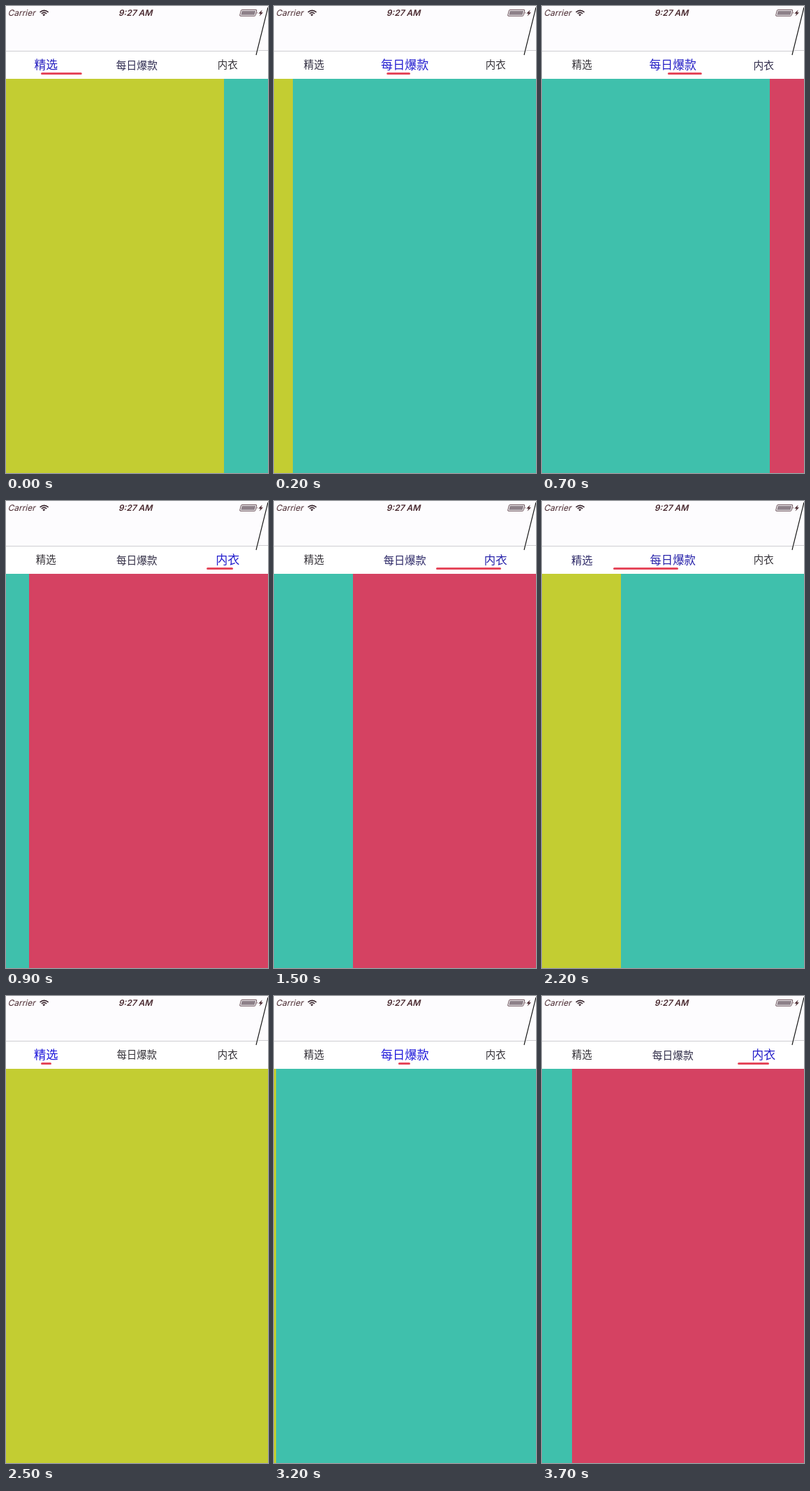
These frames come from a looping animation (375 by 667 pixels, 3800 ms). An HTML page:

```html
<!DOCTYPE html>
<html lang="zh-CN">
<head>
<meta charset="utf-8">
<style>
  html, body { margin: 0; width: 100%; height: 100%; overflow: hidden; background: #fff; }
  svg { display: block; width: 375px; height: 667px; }
  .status { font: 12px Inter, Roboto, sans-serif; fill: #4a2a30; }
  .tab { font: 14.4px "Noto Sans CJK SC", "Noto Sans CJK", sans-serif; text-anchor: middle; }
</style>
</head>
<body>
<svg viewBox="0 0 375 667">
  <rect width="375" height="667" fill="#fff"/>
  <rect width="375" height="64" fill="#fdfcfe"/>
  <path d="M0 64.5H359M361 63.5H375" stroke="#cfced2"/>
  <path d="M358 70L375 2" stroke="#111" stroke-width="1.1"/>

  <g class="status">
    <text transform="translate(2.5 14.3) skewX(-14)">Carrier</text>
    <text transform="translate(185 14.3) skewX(-14)" text-anchor="middle" font-weight="600">9:27 AM</text>
    <g fill="none" stroke="#35222a" stroke-width="1.6">
      <path d="M48.6 8.9Q54.6 3.8 60.6 8.9M50.8 11Q54.5 7.9 58.2 11"/>
      <path d="M52.3 12.2Q54.3 10.8 56.3 12.2L54 14.5Z" fill="#35222a" stroke="none"/>
    </g>
    <g transform="translate(333.8 14.5) skewX(-14)">
      <rect x=".5" y="-9" width="22.5" height="8.7" rx="1.5" fill="none" stroke="#62474f" stroke-width=".9"/>
      <rect x="2" y="-7.6" width="19.5" height="5.9" fill="#8d8088"/>
      <path d="M24 -6.3q1.6 1.6 0 3.2z"/>
    </g>
    <path d="M366.6 5.6L361.3 10.7H364.2L362.6 14.4L368 9.2H365.2Z"/>
  </g>

  <g id="tabs"></g>
  <rect id="bar" y="95" height="3" rx="1.5" fill="#e5475a"/>
  <g id="pages"></g>
</svg>
<script>
const LOOP = 3800, STEP = 100, WIDTH = 375;
const TAB_GAP = 130, BAR_LEFT = 50, BAR_WIDTH = 15;
const NORMAL = [51, 48, 54], ACTIVE = [34, 28, 220];

// Each swipe: start time, first page, direction, progress after each step.
const swipes = [
  { start: 0, from: 0, dir: 1, progress: [0.168, 0.64, 0.928, 0.99, 1] },
  { start: 700, from: 1, dir: 1, progress: [0.13, 0.6, 0.912, 0.985, 1] },
  { start: 1500, from: 2, dir: -1, progress: [0.3, 0.78, 0.965, 1] },
  { start: 2200, from: 1, dir: -1, progress: [0.3, 0.78, 0.965, 1] },
  { start: 2900, from: 0, dir: 1, progress: [0.2, 0.68, 0.935, 0.992] },
  { start: 3500, from: 1, dir: 1, progress: [0.11, 0.55, 0.885] }
];

function add(parent, tag, attrs, text = "") {
  const node = document.createElementNS("http://www.w3.org/2000/svg", tag);
  for (const key in attrs) node.setAttribute(key, attrs[key]);
  node.textContent = text;
  return document.getElementById(parent).appendChild(node);
}

const tabs = ["精选", "每日爆款", "内衣"].map(name =>
  add("tabs", "text", { class: "tab", y: 5.4 }, name));
const pages = ["#c3cd32", "#3fc0ac", "#d54262"].map(fill =>
  add("pages", "rect", { y: 104, width: WIDTH, height: 563, fill }));
const bar = document.getElementById("bar");

function offsetAt(time) {
  const swipe = swipes.filter(s => s.start <= time).pop();
  const step = Math.floor((time - swipe.start) / STEP);
  const last = swipe.progress.length - 1;
  return swipe.from + swipe.dir * swipe.progress[Math.min(step, last)];
}

function render(time) {
  const offset = offsetAt(time);
  pages.forEach((page, i) => page.setAttribute("x", Math.round((i - offset) * WIDTH)));

  tabs.forEach((tab, i) => {
    const focus = Math.max(0, 1 - Math.abs(i - offset));
    const color = NORMAL.map((c, k) => Math.round(c + (ACTIVE[k] - c) * focus));
    tab.setAttribute("fill", `rgb(${color})`);
    tab.setAttribute("transform", `translate(${57.2 + i * TAB_GAP} 84) scale(${1 + 0.2 * focus})`);
  });

  // The leading edge stretches first, then the trailing edge catches up.
  const page = Math.floor(offset), part = offset - page;
  const left = BAR_LEFT + TAB_GAP * (page + Math.max(0, 2 * part - 1));
  const right = BAR_LEFT + BAR_WIDTH + TAB_GAP * (page + Math.min(1, 2 * part));
  bar.setAttribute("x", left);
  bar.setAttribute("width", right - left);
}

const began = performance.now();
function tick() {
  render((performance.now() - began) % LOOP);
  requestAnimationFrame(tick);
}
tick();
</script>
</body>
</html>
```
